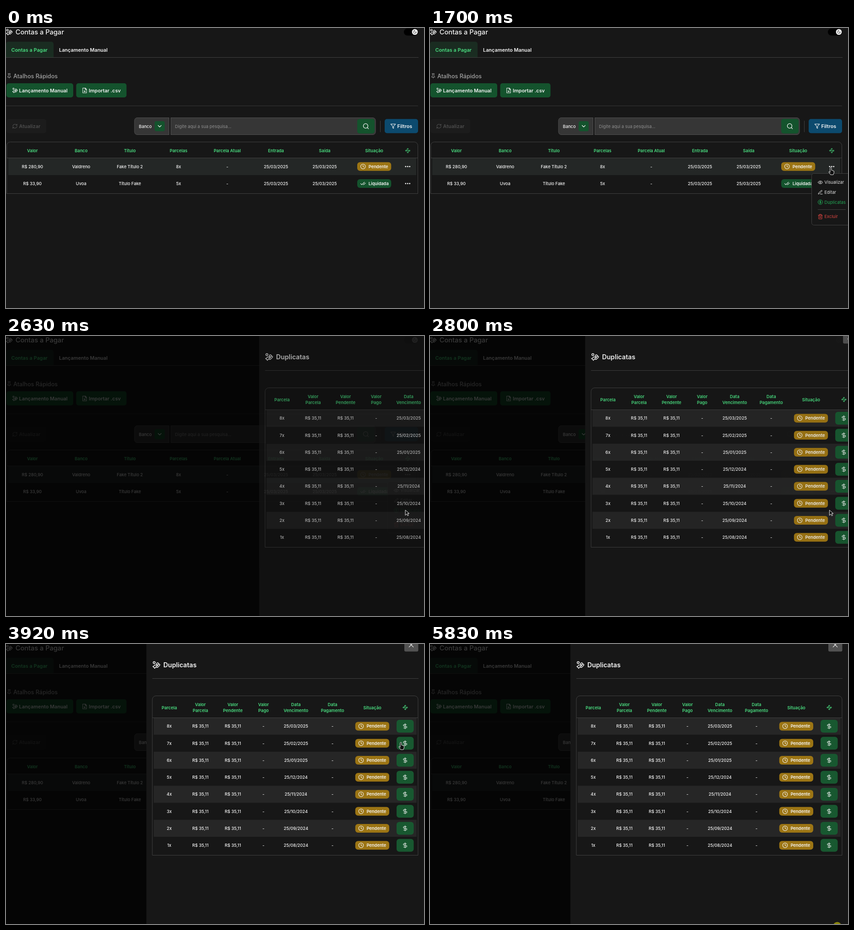
An HTML page for the animation above (5910 ms loop, 914 px wide and 613 px high).

```html
<!DOCTYPE html>
<html lang="pt-BR">
<head>
<meta charset="utf-8">
<title>Contas a Pagar</title>
<style>
html, body { margin: 0; width: 100%; height: 100%; overflow: hidden; background: #171717; }
svg { display: block; width: 914px; height: 613px; }
text { font-family: Inter, "Open Sans", sans-serif; white-space: pre; }
</style>
</head>
<body>
<svg id="stage" viewBox="0 0 914 613" xmlns="http://www.w3.org/2000/svg"></svg>
<script>
const LOOP = 5910;
const GREEN = '#14532d', LIME = '#4ade80', WHITE = '#f5f5f5', LINE = '#404040', BG = '#171717';
const AMBER = '#9c7514', MUTED = '#a3a3a3', FAINT = '#4d4d4d', FIELD = '#363636', EDGE = '#505050';

// Icon parts on a 24 unit grid
const ring = (x, y, r) => `M${x - r} ${y}a${r} ${r} 0 0 1 ${2 * r} 0a${r} ${r} 0 0 1 ${-2 * r} 0`;
const cash = r => `M${12 + 1.5 * r} ${12 - 2 * r}H${12 - r}a${r} ${r} 0 0 0 0 ${2 * r}h${2 * r}a${r} ${r} 0 0 1 0 ${2 * r}H${12 - 1.8 * r}M12 ${12 - 3 * r}v${6 * r}`;
const around = part => [0, 1, 2, 3].map(k => part(Math.cos(k * Math.PI / 2), Math.sin(k * Math.PI / 2))).join('');
const ICONS = {
  coins: 'M3 17l5-5h5a2 2 0 0 1 0 4h-2M7 21l2-2h7l6-6a2 2 0 0 0-3-3l-4 4M2 16l6 6' + ring(16, 8.5, 3) + ring(6, 5, 3),
  pin: 'M12 17v5M7 2h10M9 3v8l-4 4v2h14v-2l-4-4V3',
  file: 'M15 2H4v20h16V7zM14 2v6h6M12 12v6M9 15l3 3 3-3',
  refresh: 'M21 8A10 10 0 0 0 3 12M21 3v5h-5M3 16a10 10 0 0 0 18-4M3 21v-5h5',
  chevron: 'M6 9l6 6 6-6',
  search: 'M21 21l-4-4' + ring(11, 11, 8),
  filter: 'M22 3H2l8 9v7l4 2v-9z',
  moon: 'M12 3a6 6 0 0 0 9 9 9 9 0 1 1-9-9',
  nodes: 'M10 6l-4 4M7 12h10M14 18l4-4' + around((c, s) => ring(12 + 7.5 * c, 12 + 7.5 * s, 2.5)),
  clock: 'M12 6v6l4 2' + ring(12, 12, 10),
  checks: 'M18 6L7 17l-5-5M22 10l-8 7-1-1',
  eye: 'M2 12a11 11 0 0 1 20 0 11 11 0 0 1-20 0' + ring(12, 12, 3),
  pen: 'M12 20h9M16 4a2 2 0 0 1 3 3L7 19l-4 1 1-4z',
  coin: cash(2) + ring(12, 12, 10),
  trash: 'M3 6h18M5 6v16h14V6M8 6V2h8v4M10 11v6M14 11v6',
  dollar: cash(3.5),
  close: 'M4 4l16 16M20 4L4 20'
};

// x, y is the icon centre
const icon = (name, x, y, size = 12.5, color = WHITE) =>
  `<path d="${ICONS[name]}" transform="translate(${x - size / 2} ${y - size / 2}) scale(${size / 24})" fill="none" stroke="${color}" stroke-width="2" stroke-linecap="round" stroke-linejoin="round"/>`;
// y is the middle of the capitals
const text = (s, x, y, { size = 9.33, weight = 500, color = WHITE, anchor = 'start' } = {}) =>
  `<text x="${x}" y="${y + size * .364}" font-size="${size}" font-weight="${weight}" fill="${color}" text-anchor="${anchor}">${s}</text>`;
const mid = (s, x, y) => text(s, x, y, { anchor: 'middle' });
const head = (s, x, y) => text(s, x, y, { anchor: 'middle', weight: 600, color: LIME });
const bold = (s, x, y, color = WHITE) => text(s, x, y, { size: 10.85, weight: 600, color });
const rect = (x, y, w, h, fill, r = 0, more = '') => `<rect x="${x}" y="${y}" width="${w}" height="${h}" rx="${r}" fill="${fill}" ${more}/>`;
const path = (d, fill, stroke = 'none') => `<path d="${d}" fill="${fill}" stroke="${stroke}"/>`;
const rule = (x, w, y, color = LINE) => path(`M${x} ${y}h${w}`, 'none', color);
const topRound = (x, y, w, h, r, fill, stroke) =>
  path(`M${x} ${y + h}v${r - h}a${r} ${r} 0 0 1 ${r}-${r}h${w - 2 * r}a${r} ${r} 0 0 1 ${r} ${r}v${h - r}z`, fill, stroke);
const button = (label, mark, x, y, w, fill, color = WHITE) =>
  rect(x, y, w, 31, fill, 5) + icon(mark, x + 18.5, y + 15.7, 12.5, color) + bold(label, x + 27.6, y + 16, color);
const badge = (label, mark, x, y, fill) =>
  rect(x, y - 9.5, 74.3, 19, fill, 6) + icon(mark, x + 12.7, y) + text(label, x + 24.7, y, { weight: 600 });

function page() {
  const colX = i => 57.8 + 106.5 * i;
  const heads = ['Valor', 'Banco', 'Título', 'Parcelas', 'Parcela Atual', 'Entrada', 'Saída'];
  const date = '25/03/2025';
  const rows = [
    ['R$ 280,90', 'Valdreno', 'Fake Título 2', '8x', '-', date, date],
    ['R$ 33,90', 'Uvoa', 'Título Fake', '5x', '-', date, date]
  ];
  const rowY = j => 303.3 + 37.3 * j;

  return icon('coins', 7, 9, 15) + text('Contas a Pagar', 20.7, 9, { size: 14.6 }) +
    rect(870, 1, 31, 15.5, '#000', 7.75) + path(ring(894, 8.6, 6.4), WHITE) + icon('moon', 894, 8.6, 9, '#222') +

    topRound(0, 30, 104, 35, 5, '#1a2c21') + rule(0, 902, 64.5) +
    bold('Contas a Pagar', 11.5, 48, LIME) + bold('Lançamento Manual', 116, 48) +

    icon('pin', 7, 105, 12, MUTED) + text('Atalhos Rápidos', 16, 105.5, { size: 12.6, color: MUTED }) +
    button('Lançamento Manual', 'coins', 1, 121, 146, GREEN) +
    button('Importar .csv', 'file', 153.5, 121, 110, GREEN) +
    rule(0, 901, 170.5, FIELD) +

    button('Atualizar', 'refresh', 1, 199.3, 87, '#1c1c1c', FAINT) +
    rect(281, 196.5, 527, 37, FIELD, 6, `stroke="${EDGE}"`) + rect(357, 196, 3, 38, BG) +
    path('M356.5 197v36M360.5 197v36', 'none', EDGE) +
    text('Banco', 290.5, 215.5) + rect(325, 204, 22, 22, GREEN, 4) + icon('chevron', 336, 215, 14) +
    text('Digite aqui a sua pesquisa...', 369.5, 215.5, { weight: 400, color: '#8f8f8f' }) +
    rect(768, 199, 38, 32, GREEN, 5) + icon('search', 787, 215, 15) +
    path('M818.5 203v25', 'none', LINE) + button('Filtros', 'filter', 828, 199.3, 73, '#0c4a6e') +

    topRound(1.5, 249.5, 899, 113, 8, 'none', LINE) + rule(2, 898, 284.5) + rect(5, 285, 892, 37, '#242726') +
    heads.map((h, i) => head(h, colX(i), 268.7)).join('') + head('Situação', 805, 268.7) +
    icon('nodes', 878.5, 268.5, 12, LIME) +
    rows.map((row, j) => row.map((v, i) => mid(v, colX(i), rowY(j))).join('') +
      [-1, 0, 1].map(d => path(ring(878.3 + 4.4 * d, rowY(j), 1.4), WHITE)).join('')).join('') +
    badge('Pendente', 'clock', 768, rowY(0), AMBER) + badge('Liquidada', 'checks', 768, rowY(1), GREEN);
}

function menu() {
  const item = (mark, label, y, color = '#e5e5e5') =>
    icon(mark, 853.5, y, 12, color) + text(label, 862.5, y, { weight: 400, color });
  return rect(834.5, 318.5, 90, 113, BG, 5, `stroke="${LINE}"`) +
    item('eye', 'Visualizar', 338) + item('pen', 'Editar', 359.6) +
    item('coin', 'Duplicatas', 381.2, '#22a855') + rule(848, 61, 397.5) + item('trash', 'Excluir', 413, '#dc4540');
}

const payY = i => 180 + 37.25 * i;

function panel() {
  const cols = { 'Parcela': 357, 'Valor Parcela': 425, 'Valor Pendente': 496, 'Valor Pago': 563, 'Data Vencimento': 634, 'Data Pagamento': 714 };
  const heads = Object.entries(cols).map(([label, x]) => {
    const words = label.split(' ');
    return words.map((w, j) => head(w, x, 139.5 + (j - (words.length - 1) / 2) * 12.8)).join('');
  });
  const rows = Array.from({ length: 8 }, (_, i) => {
    const y = payY(i), due = new Date(2025, 2 - i, 25);
    const date = `25/${String(due.getMonth() + 1).padStart(2, '0')}/${due.getFullYear()}`;
    const cells = [8 - i + 'x', 'R$ 35,11', 'R$ 35,11', '-', date, '-'];
    return (i % 2 ? '' : rect(323, y - 18.7, 575, 37.25, '#262626')) +
      Object.values(cols).map((x, c) => mid(cells[c], x, y)).join('') +
      badge('Pendente', 'clock', 763.7, y, AMBER) +
      rect(854, y - 14, 37.5, 28, '#185830', 6) + icon('dollar', 872.7, y, 13);
  });
  return rect(307, 0, 607, 613, BG) + icon('coins', 328.5, 46, 18) +
    text('Duplicatas', 344, 46.3, { size: 14.2, weight: 600 }) + rule(320, 582, 75.5) +
    rect(871, -14, 30.5, 30.5, '#525252', 3) + icon('close', 886, 2, 14) +
    topRound(320, 113.5, 581, 349, 8, 'none', LINE) + heads.join('') +
    head('Situação', 801, 139.5) + icon('nodes', 873, 139, 12, LIME) + rows.join('') + rule(320, 581, 161.5);
}

const ARROW = 'M.5.5v11.5l3-3 2 4 2-1-2-4h3.500z';
const HAND = 'M-1.500 2a1.500 1.500 0 0 1 3 0v4.500l5.500 2v4l-1.500 4h-6l-4-6 1-1 2 2z';

const $ = id => document.getElementById(id);
$('stage').innerHTML = rect(0, 0, 914, 613, BG) + page() + `<g id="menu">${menu()}</g>` +
  rect(0, 0, 914, 613, '#000', 0, 'id="shade" opacity=".77"') + `<g id="panel">${panel()}</g>` +
  '<circle id="halo" r="9" fill="#f2ea00" opacity=".52"/>' +
  '<path id="cursor" fill="#111" stroke="#fff" stroke-width=".9" stroke-linejoin="round"/>';

// Where the pointer rests or turns
const ROUTE = [
  { t: 120, x: 882, y: 604 }, { t: 680, x: 871, y: 304 }, { t: 1020, x: 877, y: 293 },
  { t: 1560, x: 877, y: 293 }, { t: 2170, x: 872, y: 380 }, { t: 2940, x: 873, y: 381 },
  { t: 3170, x: 693, y: 446 }, { t: 3310, x: 593, y: 350 }, { t: 3510, x: 808, y: 175 },
  { t: 4130, x: 873, y: 229 }, { t: 4390, x: 875, y: 195 }, { t: 4610, x: 881, y: 252 },
  { t: 4870, x: 882, y: 266 }, { t: 5560, x: 897, y: 622 }
];

// Smooth curve through the route that never overshoots a rest
function along(axis, t) {
  const i = Math.max(1, ROUTE.findIndex(p => p.t > t));
  const slope = k => ROUTE[k] && ROUTE[k - 1] ? (ROUTE[k][axis] - ROUTE[k - 1][axis]) / (ROUTE[k].t - ROUTE[k - 1].t) : 0;
  const tangent = k => {
    const a = slope(k), b = slope(k + 1);
    return a * b > 0 ? 2 * a * b / (a + b) : 0;
  };
  const p = ROUTE[i - 1], q = ROUTE[i], span = q.t - p.t, u = (t - p.t) / span, v = 1 - u;
  return v * v * ((1 + 2 * u) * p[axis] + u * span * tangent(i - 1)) +
    u * u * ((1 + 2 * v) * q[axis] - v * span * tangent(i));
}

const show = (id, on) => $(id).setAttribute('display', on ? 'inline' : 'none');
const between = (t, from, to) => t >= from && t < to;

function draw(t) {
  const open = t >= 2630, moving = between(t, 120, 5560);
  const x = moving ? along('x', t) : 890, y = moving ? along('y', t) : 611;

  show('menu', between(t, 1490, 2730));
  show('shade', open);
  show('panel', open);
  if (open) {
    const p = 1 - (1 - Math.min(1, (t - 2500) / 440)) ** 2.55;
    $('panel').setAttribute('transform', `translate(${607 * (1 - p)} 0)`);
    $('panel').setAttribute('opacity', p ** .7);
  }

  const onPay = x > 854 && Math.abs((y + 3 - payY(0)) % 37.25) < 14 && y < 290;
  const hand = open ? t > 3510 && onPay : t > 1490 || Math.abs(y - 301) < 12;
  show('cursor', moving);
  $('cursor').setAttribute('d', hand ? HAND : ARROW);
  $('cursor').setAttribute('transform', `translate(${x} ${y})`);

  show('halo', between(t, 1220, 1350) || between(t, 2370, 2500) || t >= 5830);
  $('halo').setAttribute('cx', x + .5);
  $('halo').setAttribute('cy', y + 6.5);
}

const begin = performance.now();
function loop() {
  draw((performance.now() - begin) % LOOP);
  requestAnimationFrame(loop);
}
loop();
</script>
</body>
</html>
```
